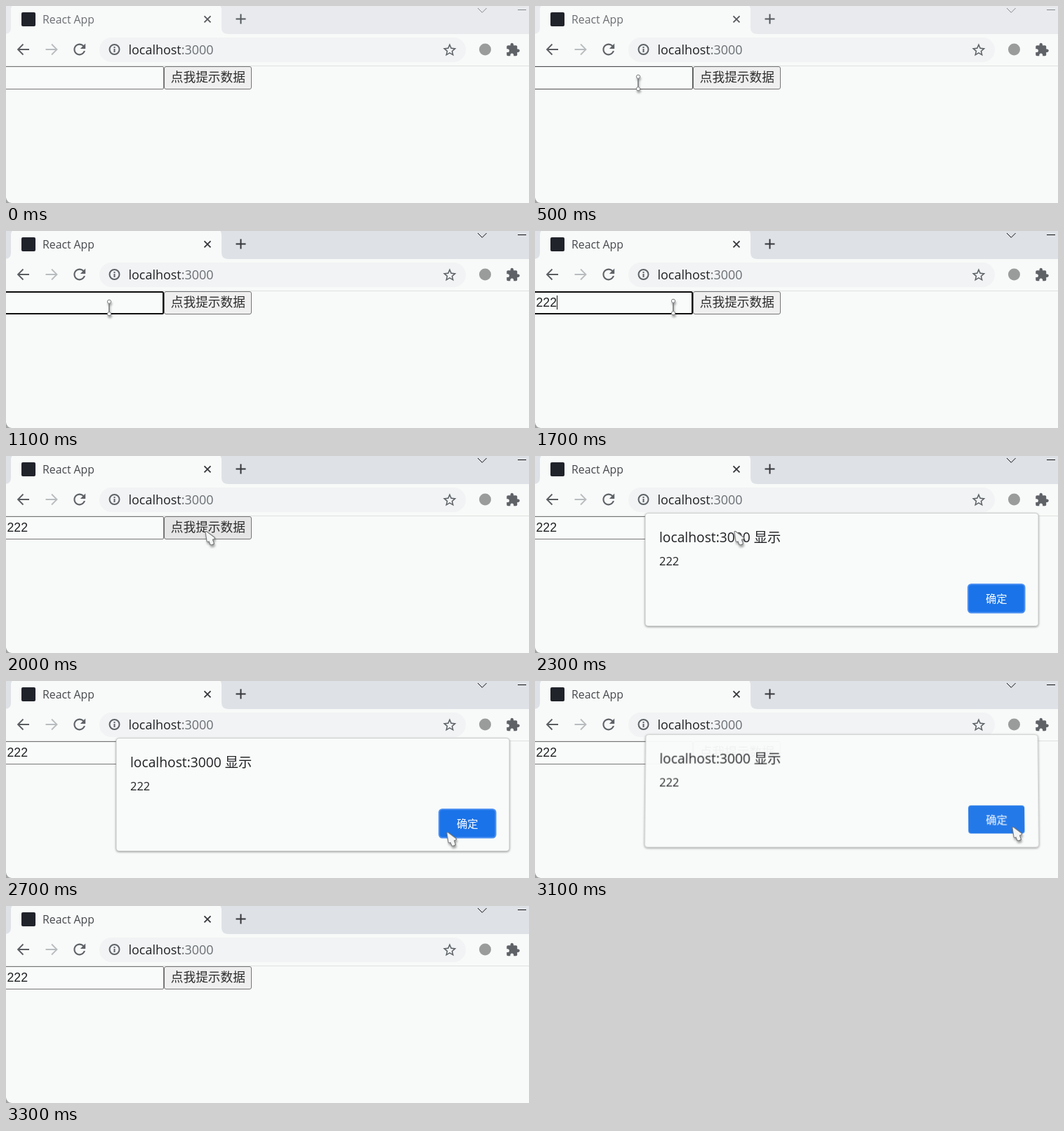
These frames come from a looping animation (745 by 281 pixels, 3.8 s). An HTML page:

```html
<!DOCTYPE html>
<html lang="zh-CN">
<head>
<meta charset="utf-8">
<title>React App</title>
<style>
  html, body { margin: 0; width: 100%; height: 100%; overflow: hidden; background: #f8faf9; }
  #stage { position: relative; width: 745px; height: 281px; overflow: hidden; background: #f8faf9; }
  svg { position: absolute; left: 0; top: 0; display: block; }
  text { font-family: "Open Sans", "Noto Sans CJK SC", "Noto Sans CJK", sans-serif; fill: #202124; white-space: pre; }
  .field { font-family: "Liberation Sans", "Noto Sans CJK SC", "Noto Sans CJK", sans-serif; font-size: 17.7px; }
  .label { font-weight: 300; fill: #2c2c2c; }
  .line { fill: none; stroke: #3c4043; }
  .icon { fill: #5f6368; }
  #strip { fill: #e8eaed; }
  #title { fill: #6b6e72; }
  #controls { stroke: #85888c; }
  .active #strip { fill: #dee1e6; }
  .active #title { fill: #45484c; }
  .active #controls { stroke: #111; }
  #tabMarks { stroke: #55585c; }
  .active #tabMarks { stroke: #34373a; }
  #dialog { position: absolute; left: 137px; top: 61px; width: 600px; height: 202px; }
  #panel { filter: drop-shadow(0 1.5px 1.5px rgba(0, 0, 0, .4)); }
  #cursor { filter: drop-shadow(1px 3px 1.5px rgba(0, 0, 0, .35)); }
</style>
</head>
<body>
<div id="stage">
  <svg width="745" height="281">
    <rect id="strip" width="745" height="40"/>
    <path fill="#f8faf9" d="M-2 40Q7 40 7 31V6Q7-3 16-3H298Q307-3 307 6V31Q307 40 317 40Z"/>
    <rect x="22" y="9" width="20" height="20" rx="2" fill="#20232a"/>
    <text id="title" x="52" y="24.8" font-size="15.8">React App</text>
    <g id="tabMarks" class="line">
      <path stroke-width="1.8" d="M282.5 14.3l9 9m0-9l-9 9"/>
      <path stroke-width="2" d="M327.5 18.5h14m-7-7v14"/>
    </g>
    <path id="controls" class="line" d="M672 3l6.3 6.3 6.3-6.3M729 5.5h12"/>

    <rect x="133" y="45" width="522" height="35" rx="17.5" fill="#f1f3f4"/>
    <path d="M0 85.5H745" stroke="#dfe1e3"/>
    <defs>
      <path id="back" d="M8 0H-8M-.5-7.5L-8 0L-.5 7.5"/>
    </defs>
    <g fill="none" stroke-width="1.8">
      <use href="#back" stroke="#5a5d61" transform="translate(25 62)"/>
      <use href="#back" stroke="#b9bcbf" transform="translate(64.5 62) scale(-1 1)"/>
    </g>
    <path class="icon" transform="translate(92.2 49.4) scale(1.05)" d="M17.65 6.35C16.2 4.9 14.21 4 12 4c-4.42 0-7.99 3.58-7.99 8s3.57 8 7.99 8c3.73 0 6.84-2.55 7.73-6h-2.08c-.82 2.33-3.04 4-5.65 4-3.31 0-6-2.69-6-6s2.69-6 6-6c1.66 0 3.14.69 4.22 1.78L13 11h7V4z"/>
    <g fill="none" stroke="#5f6368" stroke-width="2">
      <circle cx="154.5" cy="62" r="7"/>
      <path d="M154.5 61v5m0-8v2"/>
    </g>
    <text x="174.5" y="68.8" font-size="17.95">localhost<tspan fill="#6a6e73">:3000</tspan></text>
    <path class="icon" transform="translate(620.6 51.4) scale(.95)" d="M22 9.24l-7.19-.62L12 2 9.19 8.63 2 9.24l5.46 4.73L5.82 21 12 17.27 18.18 21l-1.63-7.03zM12 15.4l-3.76 2.27 1-4.28-3.32-2.88 4.38-.38L12 6.1l1.71 4.04 4.38.38-3.32 2.88 1 4.28z"/>
    <circle cx="682.5" cy="62" r="8.5" fill="#9a9c9c"/>
    <path class="icon" transform="translate(711.5 51.8) scale(.88)" d="M20.5 11H19V7c0-1.1-.9-2-2-2h-4V3.5C13 2.12 11.88 1 10.5 1S8 2.12 8 3.5V5H4c-1.1 0-1.99.9-1.99 2v3.8H3.5c1.49 0 2.7 1.21 2.7 2.7s-1.21 2.7-2.7 2.7H2V20c0 1.1.9 2 2 2h3.8v-1.5c0-1.49 1.21-2.7 2.7-2.7s2.7 1.21 2.7 2.7V22H17c1.1 0 2-.9 2-2v-4h1.5c1.38 0 2.5-1.12 2.5-2.5S21.88 11 20.5 11z"/>

    <rect id="input" x="-6" rx="1.5" fill="#f9fbfa"/>
    <text id="typed" class="field" x="1.5" y="108"></text>
    <rect id="caret" y="92" width="1" height="20" fill="#111"/>
    <rect id="button" x="225.5" y="86.5" width="124" height="32" rx="2.5" stroke="#767676"/>
    <text class="field label" x="234.8" y="108.4">点我提示数据</text>
    <path fill="#a3a5a5" d="M0 273Q1 280 8 281H0Z"/>
  </svg>

  <div id="dialog">
    <svg width="600" height="202" viewBox="137 61 600 202">
      <rect id="panel" x="157" y="81.5" width="560" height="161" rx="4" fill="#f9fbfa" stroke="#c4c6c6" stroke-width=".8"/>
      <text x="177" y="123" font-size="19.25">localhost:3000 显示</text>
      <text x="177" y="155.8" font-size="16.5">222</text>
      <rect x="617" y="183" width="80" height="40" rx="4" fill="#1a73e8"/>
      <rect id="ring" x="617" y="183" width="80.5" height="40.5" rx="4.5" fill="none" stroke="#4c8ff2" stroke-width="2"/>
      <text x="642" y="209" font-size="15.3" font-weight="500" style="fill:#fff">确定</text>
    </svg>
  </div>

  <svg width="745" height="281">
    <g id="cursor">
      <path id="arrow" fill="#f3f4f4" stroke="#77797b" stroke-width="1.1" d="M0 1.5Q0 0 1.7.5L13 9Q14.5 10.5 12.5 11.5L10.5 12.3 12.5 18Q10 20.5 7 19.5L5 15 3.5 15.5Q2 15.5 2 14Z"/>
      <g id="beam" fill="#fff" stroke="#77797b">
        <path stroke-width="1.6" d="M0-6V6"/>
        <circle cy="-8.7" r="2.6"/>
        <circle cy="8.7" r="2.6"/>
      </g>
    </g>
  </svg>
</div>
<script>
const LOOP = 3800, STEP = 100;
const el = id => document.getElementById(id);
const rowAt = (table, t) => table.findLast(row => row[0] <= t);
const show = (node, on) => { node.style.display = on ? '' : 'none'; };
const setAttrs = (node, attrs) => {
  for (const name in attrs) node.setAttribute(name, attrs[name]);
};

// time, shape, x, y
const pointer = [
  [0, ''],
  [100, 'arrow', 600, 104], [200, 'arrow', 458, 105], [300, 'arrow', 248, 109],
  [400, 'beam', 160, 109.5], [500, 'beam', 147, 109.5],
  [1600, 'beam', 165, 109], [1700, 'beam', 197, 108.5],
  [1800, 'arrow', 245, 112], [1900, 'arrow', 278, 109], [2000, 'arrow', 284, 107],
  [2500, 'arrow', 305, 118], [2600, 'arrow', 533, 183], [2700, 'arrow', 628, 215.5],
  [2800, 'arrow', 650, 214], [2900, 'arrow', 672, 210], [3000, 'arrow', 680, 208],
  [3300, '']
];
const typing = [[0, ''], [1300, '2'], [1500, '22'], [1700, '222']];
// time, opacity, vertical offset, tilt in degrees
const dialogPose = [
  [0, 0, 0, 0],
  [2100, .85, -11, 5], [2200, .98, -3, 1.5], [2300, 1, 0, 0],
  [3100, .96, -5.5, 3], [3200, .4, -14, 6], [3300, 0, 0, 0]
];

function draw(t) {
  const active = t >= 600, focused = active && t < 2000;
  el('stage').classList.toggle('active', active);

  const [, shape, x, y] = rowAt(pointer, t);
  show(el('arrow'), shape === 'arrow');
  show(el('beam'), shape === 'beam');
  if (shape) setAttrs(el('cursor'), { transform: `translate(${x} ${y})` });

  // Keep the border inside the 86 to 119 px box at either weight.
  const border = focused ? 2 : 1;
  setAttrs(el('input'), {
    y: 86 + border / 2, width: 231 - border / 2, height: 33 - border,
    stroke: focused ? '#101010' : shape === 'beam' ? '#4f4f4f' : '#767676',
    'stroke-width': border
  });

  const value = rowAt(typing, t)[1];
  el('typed').textContent = value;
  setAttrs(el('caret'), { x: Math.floor(2 + value.length * 9.8) });
  show(el('caret'), focused && !(t >= 1100 && t < 1300));

  const [, opacity, dy, tilt] = rowAt(dialogPose, t);
  const hover = shape === 'arrow' && x > 225 && x < 350 && opacity === 0;
  setAttrs(el('button'), { fill: hover ? '#e5e5e5' : '#efefef' });

  const dialog = el('dialog');
  show(dialog, opacity > 0);
  dialog.style.opacity = opacity;
  dialog.style.transform = dy ? `translateY(${dy}px) perspective(1500px) rotateX(${tilt}deg)` : 'none';
  show(el('ring'), t < 3000);
}

const start = performance.now();
function tick() {
  const t = (performance.now() - start) % LOOP;
  draw(Math.floor(t / STEP) * STEP);
  requestAnimationFrame(tick);
}
tick();
</script>
</body>
</html>
```
